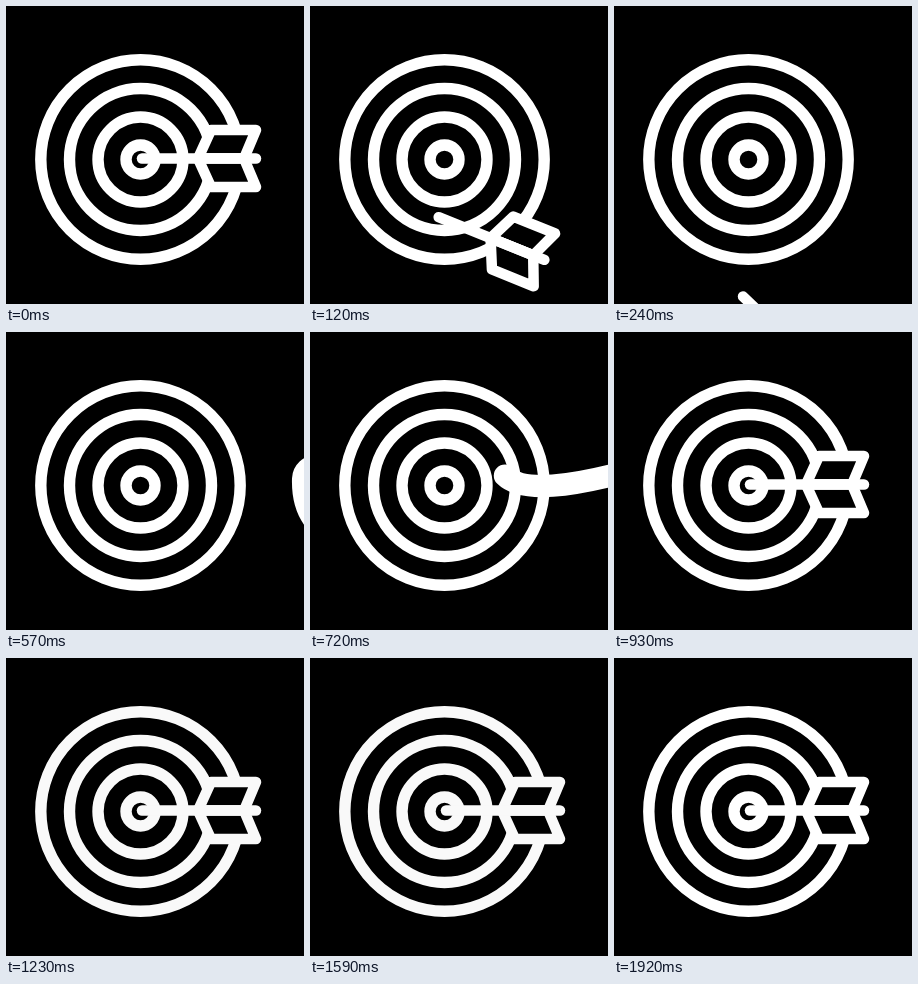
Recreate the animation shown at these times as an HTML page with a canvas. Size 298 by 298 pixels, loop 1950 ms.

```html
<!DOCTYPE html>
<html>
<head>
<meta charset="utf-8">
<title>Target and arrow</title>
<style>
  html, body { margin: 0; width: 100%; height: 100%; overflow: hidden; background: #000; }
  canvas { display: block; }
</style>
</head>
<body>
<canvas id="stage" width="298" height="298"></canvas>
<script>
const ctx = document.getElementById('stage').getContext('2d');
const LOOP = 1950, STEP = 30;

// Arrow poses: tip x,y | shaft bend x,y | feather joint x,y | feather scale x,y | line width | angle
const FAR  = [310, 147, 306, 262, 620, 130, 4, 4.8, 48, 0.1];
const NEAR = [155, 142.5, 190, 136, 237, 135.5, 1.12, 1.4, 13.5, -0.02];
const REST = [136, 152.5, 164, 152.5, 192, 152.5, 1, 1, 10.5, 0];
const NEAR_LEFT = 1 / 9; // share of the flight still ahead at NEAR

const clamp = v => Math.max(0, Math.min(1, v));
const span = (t, a, b) => clamp((t - a) / (b - a));
const mix = (a, b, p) => a.map((v, i) => v + (b[i] - v) * p);

function drawTarget() {
  ctx.lineWidth = 11.4;
  for (const r of [14.5, 42.5, 71, 99.7]) {
    ctx.beginPath();
    ctx.arc(134.5, 153.5, r, 0, 2 * Math.PI);
    ctx.stroke();
  }
}

function drawArrow([tx, ty, bx, by, jx, jy, sx, sy, width, angle]) {
  const cos = Math.cos(angle), sin = Math.sin(angle);
  const at = (x, y) => [jx + x * sx * cos - y * sy * sin, jy + x * sx * sin + y * sy * cos];
  ctx.lineWidth = width;
  for (const side of [-28.5, 28.5]) {
    ctx.beginPath();
    for (const [x, y] of [[0, 0], [13, side], [58, side], [46, 0]]) ctx.lineTo(...at(x, y));
    ctx.closePath();
    ctx.fill();
    ctx.stroke();
  }
  ctx.beginPath();
  ctx.moveTo(tx, ty);
  ctx.quadraticCurveTo(bx, by, jx, jy);
  ctx.lineTo(...at(58, 0));
  ctx.stroke();
}

function drawFalling(t) {
  const p = t / 120;
  ctx.save();
  ctx.translate(193 - 11.5 * p, 152.5 + 80 * p ** 1.15);
  ctx.rotate(0.384 * p);
  ctx.translate(-193, -152.5);
  drawArrow(REST);
  ctx.restore();
}

// One decelerating flight that passes through the NEAR pose.
function drawFlying(t) {
  const left = (1 - span(t, 570, 930)) ** 2;
  drawArrow(left > NEAR_LEFT
    ? mix(NEAR, FAR, span(left, NEAR_LEFT, 1))
    : mix(REST, NEAR, left / NEAR_LEFT));
}

function render(t) {
  const dim = span(t, 1080, 1230) - span(t, 1650, 1920);
  const level = Math.round(255 - 6 * dim);
  ctx.fillStyle = '#000';
  ctx.fillRect(0, 0, 298, 298);
  ctx.strokeStyle = `rgb(${level},${level},${level})`;
  ctx.lineCap = ctx.lineJoin = 'round';
  drawTarget();
  if (t < 270) drawFalling(t);
  else if (t >= 570) drawFlying(t);
}

const start = performance.now();
function tick() {
  const t = (performance.now() - start) % LOOP;
  render(Math.floor(t / STEP) * STEP);
  requestAnimationFrame(tick);
}
tick();
</script>
</body>
</html>
```
